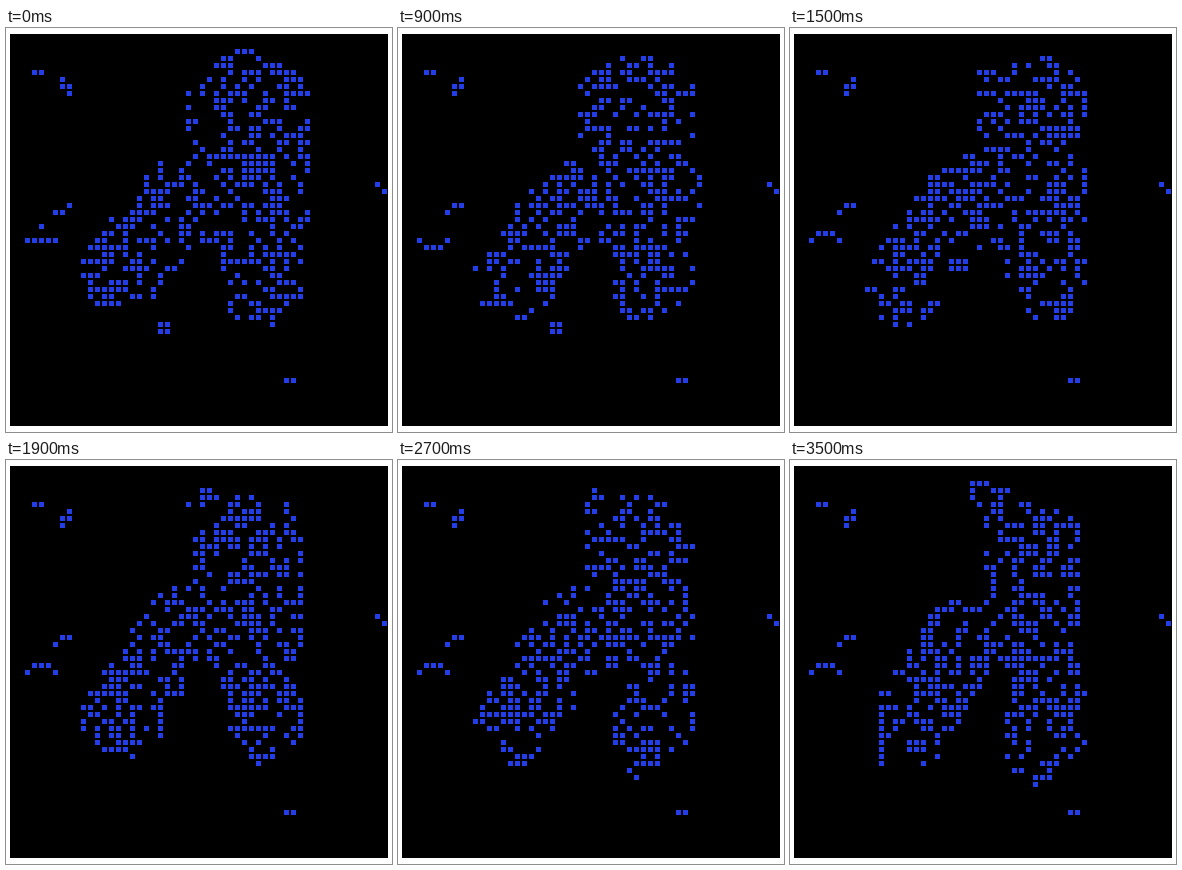
Animation, 386 px wide and 404 px high, one loop 3.6 s. Source, as an HTML page with a canvas:

```html
<!DOCTYPE html>
<html lang="en">
<head>
<meta charset="utf-8">
<title>Amoeba automaton</title>
<style>
html, body { margin: 0; width: 100%; height: 100%; overflow: hidden; background: #fff; }
canvas { display: block; }
</style>
</head>
<body>
<canvas id="stage" width="386" height="404"></canvas>
<script>
const ctx = document.getElementById('stage').getContext('2d');
const COLS = 54, ROWS = 56, CELL = 7, DOT = 5;
const STEPS = 36, STEP_MS = 100, WARMUP = 8, BLOCK_END = 12;

let seed = 20;
function random() {
  seed = (Math.imul(seed, 1664525) + 1013904223) >>> 0;
  return seed / 4294967296;
}

function nearLine(x, y, x1, y1, x2, y2, radius) {
  const dx = x2 - x1, dy = y2 - y1;
  const along = ((x - x1) * dx + (y - y1) * dy) / (dx * dx + dy * dy);
  const k = Math.min(1, Math.max(0, along));
  return Math.hypot(x - x1 - k * dx, y - y1 - k * dy) < radius;
}

// The colony is a body on two legs; over the loop it slims, its legs and a spur grow
function inColony(c, r, step) {
  const p = Math.max(0, step) / (STEPS - 1);
  const near = (...line) => nearLine(c + 0.5, r + 0.5, ...line);
  return near(34, 11 + p, 34, 24, 9 - 1.5 * p) ||
    near(25, 23, 16, 34 + 4 * p, 6) ||
    near(35, 24, 36, 36 + 4 * p, 6) ||
    near(30, 10, 28, 9 - 6 * p, 3);
}

const inZone = (c, r) => c > 8 && c < 47 && r < 47;

function makeGrid(rule) {
  return Array.from({ length: ROWS }, (_, r) =>
    Array.from({ length: COLS }, (_, c) => rule(c, r) ? 1 : 0));
}

function run(grid, c, r, count, dc = 1, dr = 0) {
  for (let i = 0; i < count; i++) grid[r + i * dr][c + i * dc] = 1;
}

function placeBlock(grid) {
  run(grid, 21, 41, 2);
  run(grid, 21, 42, 2);
}

// Small still lifes and oscillators around the colony
function placeSatellites(grid) {
  run(grid, 3, 5, 2);
  run(grid, 39, 49, 2);
  run(grid, 52, 21, 2, 1, 1);
  run(grid, 7, 6, 2, 1, 1);
  run(grid, 7, 7, 2, 1, 1);
  run(grid, 6, 25, 2);
  run(grid, 8, 24, 1);
  run(grid, 4, 27, 1);
  run(grid, 2, 29, 5);
}

function neighbours(grid, c, r) {
  let n = -grid[r][c];
  for (let y = Math.max(0, r - 1); y <= Math.min(ROWS - 1, r + 1); y++)
    for (let x = Math.max(0, c - 1); x <= Math.min(COLS - 1, c + 1); x++) n += grid[y][x];
  return n;
}

// Rule B357/S1358; a few extra births keep the colony filled
function evolve(grid, step) {
  const next = makeGrid((c, r) => {
    const n = neighbours(grid, c, r);
    const zone = inZone(c, r);
    if (zone && !inColony(c, r, step)) return false;
    if (grid[r][c]) return [1, 3, 5, 8].includes(n);
    return [3, 5, 7].includes(n) || (zone && (n === 1 || n === 2) && random() < 0.1);
  });
  if (step < BLOCK_END) placeBlock(next);
  return next;
}

function history() {
  let grid = makeGrid((c, r) => inColony(c, r, 0) && random() < 0.42);
  placeSatellites(grid);
  placeBlock(grid);
  for (let s = -WARMUP + 1; s <= 0; s++) grid = evolve(grid, s);
  const list = [grid];
  for (let s = 1; s < STEPS; s++) list.push(grid = evolve(grid, s));
  return list;
}

const generations = history();

function draw() {
  const step = Math.floor(performance.now() / STEP_MS) % STEPS;
  ctx.fillStyle = '#fff';
  ctx.fillRect(0, 0, 386, 404);
  ctx.fillStyle = '#000';
  ctx.fillRect(4, 6, COLS * CELL, ROWS * CELL);
  ctx.fillStyle = '#233de8';
  generations[step].forEach((row, r) => row.forEach((on, c) => {
    if (on) ctx.fillRect(5 + c * CELL, 7 + r * CELL, DOT, DOT);
  }));
  requestAnimationFrame(draw);
}
draw();
</script>
</body>
</html>
```
